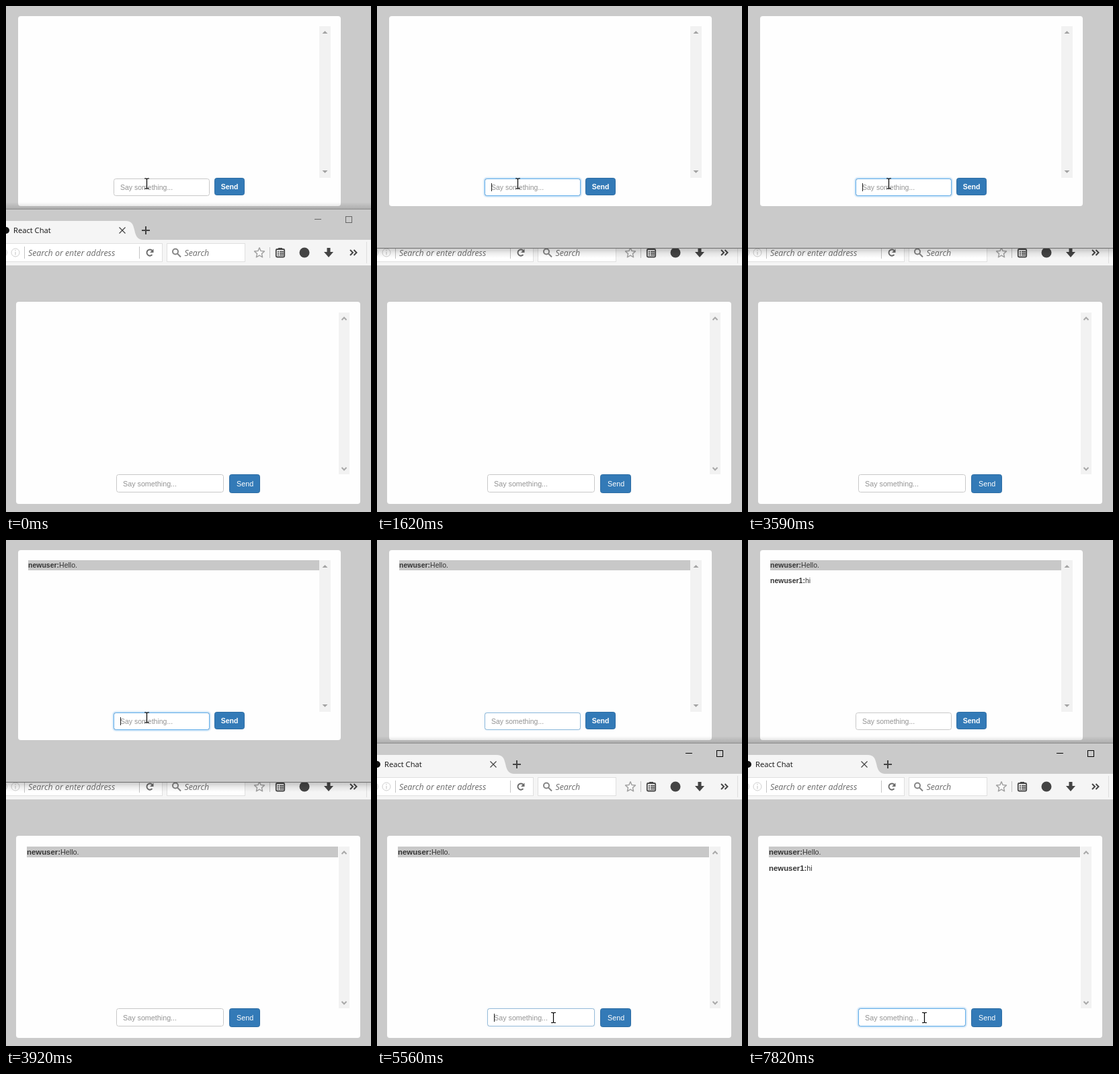
Write an HTML page that moves like this. It is 543 by 751 pixels and loops after 8 s.

```html
<!DOCTYPE html>
<html lang="en">
<head>
<meta charset="utf-8">
<title>React Chat</title>
<style>
  html, body { margin: 0; width: 100%; height: 100%; overflow: hidden; background: #cacaca; }
  svg { display: block; }
  text { font-family: "Liberation Sans", Arial, sans-serif; font-size: 10.5px; fill: #333; white-space: pre; }
  .ff { font-size: 10.75px; }
  .ui { font-family: "Open Sans", "Noto Sans", sans-serif; fill: #111; }
  .hint { font-style: italic; font-size: 12.4px; fill: #6c6c6c; }
  .b { font-weight: bold; }
  .ffb { font-weight: bold; font-size: 11.4px; }
  .ph { fill: #939393; }
  .typed { fill: #444; }
  .white { fill: #fff; }
  .line { fill: none; stroke: #444; }
  .glow { fill: none; stroke: #66afe9; }
  .btn { fill: #337ab7; stroke: #2e6da4; }
  .crisp { shape-rendering: crispEdges; }
</style>
</head>
<body>
<svg id="stage" width="543" height="751" viewBox="0 0 543 751">
  <defs>
    <linearGradient id="shade" x1="0" y1="0" x2="0" y2="1">
      <stop offset="0" stop-opacity=".2"/>
      <stop offset=".5" stop-opacity=".07"/>
      <stop offset="1" stop-opacity="0"/>
    </linearGradient>
    <linearGradient id="rise" x1="0" y1="1" x2="0" y2="0">
      <stop offset="0" stop-opacity=".14"/>
      <stop offset="1" stop-opacity="0"/>
    </linearGradient>
  </defs>
  <rect width="543" height="751" fill="#cacaca"/>

  <!-- upper page -->
  <rect x="18" y="15" width="480" height="282" rx="4" fill="#fefefe"/>
  <rect x="466" y="30" width="17" height="225" fill="#f2f2f2"/>
  <path d="M470.500 41h8l-4-4zM470.500 244h8l-4 4z" fill="#a3a3a3"/>
  <g data-on="3920-8000">
    <rect class="crisp" x="33" y="30" width="433" height="15" fill="#c8c8c8"/>
    <text x="33" y="41"><tspan class="b">newuser:</tspan>Hello.</text>
  </g>
  <text x="33" y="64" data-on="7400-8000"><tspan class="b">newuser1:</tspan>hi</text>
  <g id="topBox"></g>
  <rect class="btn" x="310.5" y="255.500" width="44" height="25" rx="3"/>
  <text class="b white" x="319.700" y="272">Send</text>

  <!-- lower window -->
  <g data-on="0-500 5560-8000">
    <rect x="0" y="291" width="543" height="10" fill="url(#rise)"/>
    <rect x="0" y="301" width="543" height="46" fill="#cacaca"/>
    <rect x="0" y="301" width="543" height="1" fill="#8c8c8c"/>
    <path d="M0 319H178C187 319 189 324 191 332C193 341 195 346 203 347H0Z" fill="#f5f5f5"/>
    <circle cx="0" cy="333" r="5" fill="#111"/>
    <text class="ui" x="11" y="337" font-size="11.2" style="font-size:11.2px">React Chat</text>
    <path class="line" d="M168.500 328.500l9 9m0-9l-9 9" stroke-width="1.200"/>
    <path class="line" d="M202 333h12m-6-6v12" stroke-width="2"/>
    <g class="crisp" id="caps" fill="none">
      <path d="M459 316.500h10M505.500 312.500h9v9h-9z"/>
    </g>
  </g>
  <rect x="0" y="347" width="543" height="38" fill="#f5f5f5"/>
  <g class="crisp">
    <path d="M-1 352.500H232.500V379.500H-1zM239.500 352.500H355.500V379.500H239.500z" fill="#fff" stroke="#e0e0e0"/>
    <path d="M27.500 357v18M198.500 357v18M392.500 358v16" stroke="#c4c4c4"/>
    <path d="M536.500 350v32" stroke="#dedede"/>
  </g>
  <g fill="none" stroke="#cfcfcf">
    <circle cx="14" cy="366" r="6"/><path d="M14 365v4.500M14 362v1.500" stroke-width="1.300"/>
    <circle cx="-5" cy="366" r="6.500"/>
  </g>
  <text class="ui hint" x="33" y="371">Search or enter address</text>
  <text class="ui hint" x="265.500" y="371">Search</text>
  <path d="M217.500 369.200A4.600 4.600 0 1 1 217.500 363" fill="none" stroke="#6a6a6a" stroke-width="1.900"/>
  <path d="M219.500 360.500v5.500h-5.500z" fill="#6a6a6a"/>
  <g fill="none" stroke="#858585" stroke-width="2"><circle cx="252" cy="364.500" r="4"/><path d="M255 367.500l5 5"/></g>
  <path id="star" fill="#fafafa" stroke="#a3a3a3" stroke-width="1.500" stroke-linejoin="round"/>
  <rect x="401.800" y="361" width="12.400" height="11.500" rx="1.500" fill="none" stroke="#444" stroke-width="1.800"/>
  <path d="M405 359h6v2h-6z" fill="#444"/>
  <path d="M404 364.500h2m1 0h6M404 367h2m1 0h6M404 369.500h2m1 0h6" stroke="#444" stroke-width="1.300"/>
  <circle cx="444" cy="366" r="7.500" fill="#444"/>
  <path d="M477.500 359h5v6h4.500l-7 8-7-8h4.500z" fill="#444"/>
  <path class="line" d="M512 362l4 4-4 4m5.500-8l4 4-4 4" stroke-width="2"/>

  <g data-on="500-5560">
    <rect x="0" y="297" width="543" height="62" fill="#cacaca"/>
    <rect x="0" y="359" width="543" height="1" fill="#707070"/>
    <rect x="0" y="360" width="543" height="14" fill="url(#shade)"/>
  </g>

  <rect x="15" y="439" width="512" height="300" rx="4" fill="#fefefe"/>
  <rect x="495" y="455" width="16" height="240" fill="#f2f2f2"/>
  <path d="M499.500 466l3.500-3.500 3.500 3.500M499.500 685l3.500 3.500 3.500-3.500" fill="none" stroke="#a8a8a8" stroke-width="2"/>
  <g data-on="3920-8000">
    <rect class="crisp" x="31" y="455" width="463" height="16" fill="#c8c8c8"/>
    <text class="ff" x="31" y="467"><tspan class="ffb">newuser:</tspan>Hello.</text>
  </g>
  <text class="ff" x="31" y="491" data-on="7400-8000"><tspan class="ffb">newuser1:</tspan>hi</text>
  <g id="lowBox"></g>
  <rect class="btn" x="332.500" y="695.500" width="45" height="27" rx="3"/>
  <text class="ff white" x="343" y="713">Send</text>

  <!-- pointer -->
  <circle cx="208.500" cy="263.500" r="10" fill="none" stroke="#111" stroke-width="1.200" data-on="500-640"/>
  <path id="beam" d="M-3.500 -7.500h2.500l1 1 1-1h2.500M-3.500 7.500h2.500l1-1 1 1h2.500M0 -6.500v13" fill="none" stroke="#000" stroke-width="1.200"/>
  <path id="arrow" d="M.5 .7v15.800l3.700-3.500 2.400 5.300 2.500-1.100-2.400-5.200h5z" fill="#fff" stroke="#000"/>
</svg>
<script>
const LOOP = 8000;
const $ = id => document.getElementById(id);

// Latest entry of a [time, value...] list that has begun
const at = (list, t) => list.filter(e => e[0] <= t).pop();

const spans = s => s.split(" ").map(p => p.split("-").map(Number));
const within = (list, t) => list.some(([a, b]) => t >= a && t < b);
const show = (el, on) => el.setAttribute("visibility", on ? "visible" : "hidden");

function makeField(id, o) {
  const { x, y, w, h, base, cls } = o;
  const box = `x="${x + .5}" y="${y + .5}" width="${w - 1}" height="${h - 1}" rx="3"`;
  const g = $(id);
  g.innerHTML = `
    <g class="glow"><rect ${box} stroke-width="6" opacity=".12"/><rect ${box} stroke-width="3.500" opacity=".25"/></g>
    <rect ${box} fill="#fff" stroke="#c8c8c8"/>
    <rect ${box} class="glow"/>
    <text class="${cls}" x="${x + 10}" y="${base}"></text>
    <rect class="crisp" y="${base - 10}" width="1" height="12" fill="#222"/>`;
  const [glow, , edge, label, caret] = g.children;
  const blink = spans(o.blink);
  return t => {
    const text = at(o.text, t)[1];
    const focus = at(o.focus, t)[1];
    glow.setAttribute("opacity", focus === 1 ? 1 : focus * .3);
    edge.setAttribute("opacity", focus);
    label.textContent = text || "Say something...";
    label.setAttribute("class", `${cls} ${text ? "typed" : "ph"}`);
    const len = text ? label.getSubStringLength(0, text.length) : 0;
    caret.setAttribute("x", Math.round(x + 10 + len));
    show(caret, within(blink, t));
  };
}

const fields = [
  makeField("topBox", {
    x: 160, y: 256, w: 143, h: 26, base: 273, cls: "",
    text: [[0, ""], [2240, "H"], [2370, "He"], [2510, "Hel"], [2790, "Hell"],
      [2910, "Hello"], [3460, "Hello."], [3590, ""]],
    focus: [[0, 0], [640, 1], [5560, .6], [5710, 0]],
    blink: "640-1200 1620-4460 5000-5410"
  }),
  makeField("lowBox", {
    x: 164, y: 695, w: 160, h: 27, base: 713, cls: "ff",
    text: [[0, ""], [6660, "h"], [6950, "hi"], [7400, ""]],
    focus: [[0, 0], [5560, .5], [5710, 1]],
    blink: "5560-6110 6660-7820"
  })
];

const pointer = [
  [0, "beam", 209.5, 263.5], [4720, "arrow", 200, 358], [4870, "arrow", 238, 540],
  [5000, "arrow", 264, 673], [5150, "beam", 267.5, 708.5],
  [5290, "beam", 264.5, 709], [5410, "beam", 262.5, 709]
];

const starPoint = i => {
  const a = i * Math.PI / 5 - Math.PI / 2, r = i % 2 ? 3.6 : 7.8;
  return `${377 + r * Math.cos(a)} ${366.5 + r * Math.sin(a)}`;
};
$("star").setAttribute("d", "M" + Array.from({ length: 10 }, (_, i) => starPoint(i)).join("L") + "Z");

const timed = [...document.querySelectorAll("[data-on]")].map(el => [el, spans(el.dataset.on)]);

function draw(t) {
  timed.forEach(([el, list]) => show(el, within(list, t)));
  fields.forEach(f => f(t));
  $("caps").setAttribute("stroke", t < 500 ? "#666" : "#000");
  const [, kind, x, y] = at(pointer, t);
  ["beam", "arrow"].forEach(id => show($(id), id === kind));
  $(kind).setAttribute("transform", `translate(${x} ${y})`);
}

const start = performance.now();
function tick(now) {
  draw(Math.max(0, now - start) % LOOP);
  requestAnimationFrame(tick);
}
draw(0);
requestAnimationFrame(tick);
</script>
</body>
</html>
```
